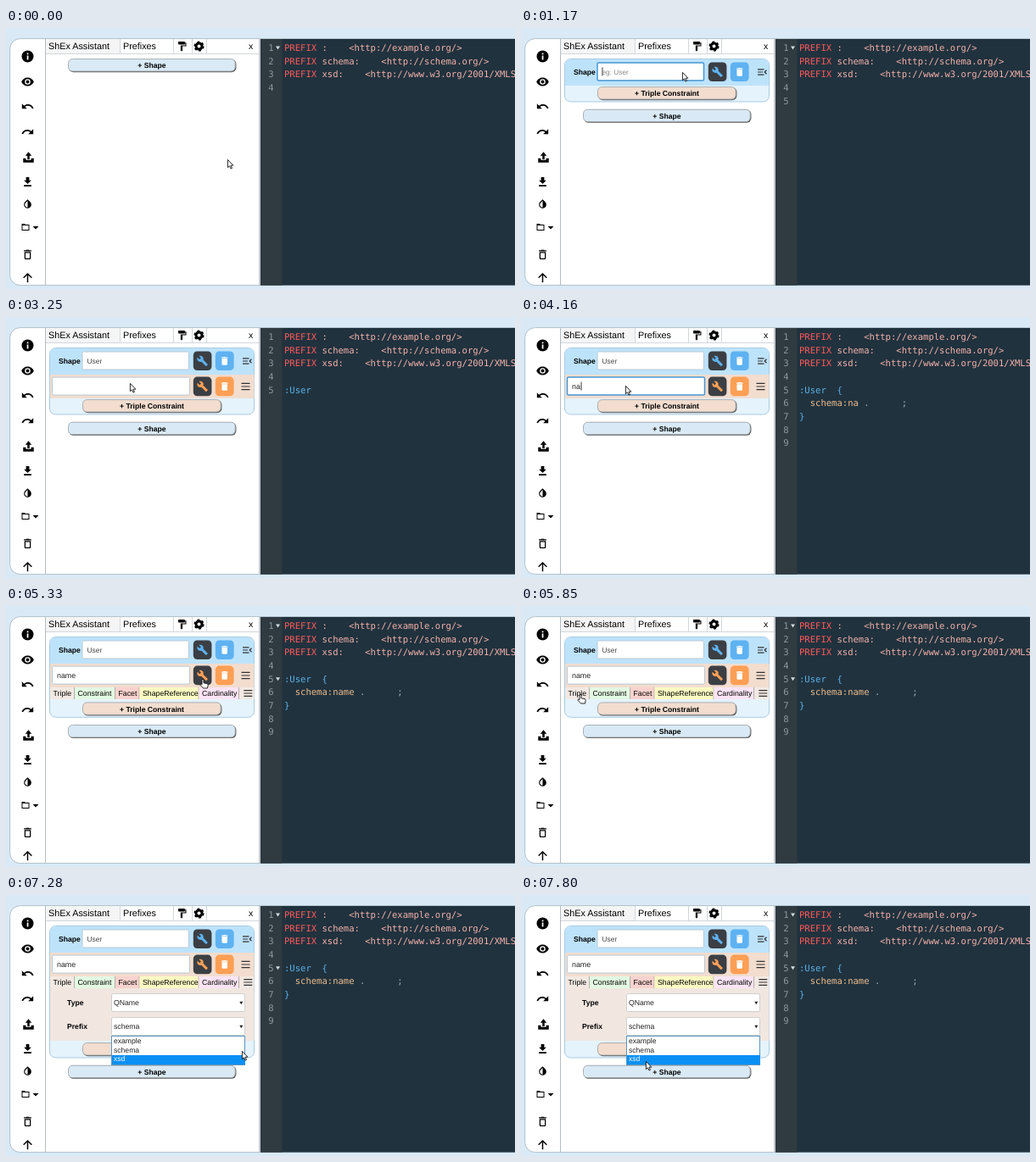
An HTML page that plays this animation: 600 px wide and 308 px high, repeating every 8 s.

```html
<!DOCTYPE html>
<html lang="en">
<head>
<meta charset="utf-8">
<title>Shape assistant</title>
<style>
  html, body { margin: 0; width: 100%; height: 100%; overflow: hidden; background: #d9eaf6; }
  svg { display: block; width: 600px; height: 308px; }
  text { white-space: pre; font-family: "Liberation Sans", Arial, sans-serif; text-rendering: geometricPrecision; }
  .code text { font: 10.55px "DejaVu Sans Mono", monospace; }
</style>
</head>
<body>
<svg id="stage" viewBox="0 0 600 308"><g id="frame"></g><g id="scene"></g></svg>
<script>
const LOOP = 8000, STEP = 130, LAST_STEP = 60;

// Icons on a 24 unit grid
const ICONS = {
  eye: 'M12 4.5C7 4.5 2.7 7.6 1 12c1.7 4.4 6 7.5 11 7.5s9.3-3.1 11-7.5c-1.7-4.4-6-7.5-11-7.5zM12 17a5 5 0 1 1 0-10 5 5 0 0 1 0 10zm0-8a3 3 0 1 0 0 6 3 3 0 0 0 0-6z',
  undo: 'M12.5 8c-2.6 0-5 1-6.9 2.6L2 7v9h9l-3.6-3.6c1.4-1.2 3.1-1.9 5.1-1.9 3.5 0 6.5 2.3 7.6 5.5l2.4-.8C21.1 11 17.1 8 12.5 8z',
  redo: 'M11.5 8c2.6 0 5 1 6.9 2.6L22 7v9h-9l3.6-3.6c-1.4-1.2-3.1-1.9-5.1-1.9-3.5 0-6.5 2.3-7.6 5.5l-2.4-.8C2.9 11 6.9 8 11.5 8z',
  upload: 'M12 1l-6 7h4v7h4V8h4zM2 13h5v3h10v-3h5v8H2z',
  download: 'M19 9h-4V3H9v6H5l7 7zM5 18v2.5h14V18z',
  drop: 'M12 2l-5.7 5.7a8 8 0 1 0 11.4 0zM12 5v14.5a6 6 0 0 1-4.2-10.3z',
  folder: 'M3 4h7l2 2h9v14H3zM5 8v10h14V8z',
  bin: 'M6 19a2 2 0 0 0 2 2h8a2 2 0 0 0 2-2V7H6zM8 9h8v10H8zM15.5 4l-1-1h-5l-1 1H5v2h14V4z',
  solidBin: 'M6 19a2 2 0 0 0 2 2h8a2 2 0 0 0 2-2V7H6zM15.5 4l-1-1h-5l-1 1H5v2h14V4z',
  up: 'M4 12l1.5 1.5 5.4-5.4V21h2.2V8.1l5.4 5.4L20 12l-8-8z',
  wrench: 'M22.7 19l-9.1-9.1c.9-2.3.4-5-1.5-6.9-2-2-5-2.4-7.4-1.3L9 6 6 9 1.6 4.7C.4 7.1.9 10.1 2.9 12.1c1.9 1.9 4.6 2.4 6.9 1.5l9.1 9.1c.4.4 1 .4 1.4 0l2.3-2.3c.5-.4.5-1.1.1-1.4z',
  roller: 'M18 4V3a1 1 0 0 0-1-1H5a1 1 0 0 0-1 1v4a1 1 0 0 0 1 1h12a1 1 0 0 0 1-1V6h1v4H9v11a1 1 0 0 0 1 1h2a1 1 0 0 0 1-1v-9h8V4z',
};

const rect = (x, y, w, h, fill, extra = '') =>
  `<rect x="${x}" y="${y}" width="${w}" height="${h}" fill="${fill}" ${extra}/>`;
const path = (d, fill, extra = '') => `<path d="${d}" fill="${fill}" fill-rule="evenodd" ${extra}/>`;
const line = (d, color, width = 1) => path(d, 'none', `stroke="${color}" stroke-width="${width}"`);
const text = (x, y, str, size = 8.6, extra = '') =>
  `<text x="${x}" y="${y}" font-size="${size}" ${extra}>${str.replace(/</g, '&lt;')}</text>`;
const bold = (x, y, str, extra = '') => text(x, y, str, 8.65, 'font-weight="bold" ' + extra);
const icon = (name, cx, cy, size, fill = '#000') =>
  path(ICONS[name], fill, `transform="translate(${cx - size / 2} ${cy - size / 2}) scale(${size / 24})"`);
const bars = (x, y, gap) => line(`M${x} ${y}h10m-10 ${gap}h10m-10 ${gap}h10`, '#333', 1.2);

// A darker plate peeks out at the bottom and right, like an outset border
const button = (x, y, w, label, fill) =>
  rect(x + 1, y + 1, w - .6, 15.2, '#555', 'rx="5.5"') +
  rect(x + .5, y + .6, w - 1.3, 14.4, fill, 'rx="5" stroke="#a3a9ad" stroke-width=".9"') +
  bold(x + w / 2, y + 11.2, label, 'text-anchor="middle"');

function input(x, y, w, value, focused, caret, size = 8.4, color = '#444') {
  return rect(x + .5, y + .5, w - 1, 21, '#fff', `rx="1.5" stroke="${focused ? '#4597d4' : '#b9c9d3'}" stroke-width="${focused ? 1.5 : 1}"`) +
    text(x + 6, y + 14.1, value, size, `fill="${color}"`) + (caret ? rect(caret, y + 6, .9, 10, '#222') : '');
}

const tools = (y, color) =>
  rect(220.8, y, 21.6, 22.6, '#3b3f44', 'rx="4.5"') + icon('wrench', 231.6, y + 11.3, 13.5, color) +
  rect(246.8, y, 21.8, 22.6, color, 'rx="4.5"') + icon('solidBin', 257.7, y + 11.3, 13, '#fff');

const select = (y, value) =>
  rect(124.5, y + .6, 157, 21, '#fff', 'rx="1.5" stroke="#cfcfcf"') +
  text(127, y + 14.1, value, 8.7, 'fill="#222"') + path(`M275.3 ${y + 9.8}h4l-2 3.4z`, '#222');

function drawFrame() {
  const gear = `<circle cx="227.5" cy="21.6" r="3.5" fill="none" stroke="#000" stroke-width="3"/>
    <circle cx="227.5" cy="21.6" r="5.2" fill="none" stroke="#000" stroke-width="1.8" stroke-dasharray="2.7 2.745"/>`;
  const info = `<circle cx="25.5" cy="33.5" r="7"/>` + rect(24.7, 32.5, 1.7, 5, '#fff') + rect(24.7, 29.5, 1.7, 1.8, '#fff');
  return path('M601 12.6H16.6a12 12 0 0 0-12 12v267a12 12 0 0 0 12 12H601z', '#fff', 'stroke="#b0c0cb"') +
    line('M46.5 13v290', '#b5bcc1') + line('M299 13v290', '#b5bcc1', 1.6) +
    rect(47, 13, 87, 17, '#f5f5f5') +
    line('M47 30.5h251M134.5 13v17.5M197.5 13v17.5M219.5 13v17.5M236.5 13v17.5', '#d3d7da') +
    text(50, 25.3, 'ShEx Assistant', 10.8) + text(138, 25.3, 'Prefixes', 10.8) + text(286, 25.3, 'x', 10.5) +
    icon('roller', 207.5, 21.6, 13.3) + gear + info +
    icon('eye', 25.5, 63.5, 16) + icon('undo', 25.5, 92.7, 16) + icon('redo', 25.5, 122.7, 16) +
    icon('upload', 26.5, 153.2, 15) + icon('download', 25.5, 181.6, 15) + icon('drop', 25.5, 207.7, 13) +
    icon('folder', 23, 235, 12) + path('M31.5 234h7l-3.5 3.5z', '#000') +
    icon('bin', 25.5, 267.3, 15) + icon('up', 25.5, 294.3, 16) +
    rect(300, 13, 300, 290.6, '#20323e') + rect(300, 13, 25.5, 290.6, '#2f3a41');
}

// Last entry [time, value...] that has begun
const current = (track, t) => track.filter(([start]) => start <= t).pop();
const within = (t, ...spans) => spans.some(([from, to]) => t >= from && t < to);

const SHAPE_TEXT = [[0, ''], [1690, 'U'], [1820, 'Us'], [1950, 'Use'], [2080, 'User']];
const TRIPLE_TEXT = [[0, ''], [3900, 'na'], [4290, 'nam'], [4420, 'name']];
const SHAPE_CODE = [[0, ''], [1950, ':U .'], [2080, ':Use .'], [2210, ':User .'], [3250, ':User'], [4160, ':User  {']];
const TRIPLE_CODE = [[0, ''], [4160, 'na'], [4420, 'name']];

// Pointer path: time, x, y, and 1 where it is a hand from then on
const POINTER = [
  [0, 261, 155], [520, 205, 47, 1], [650, 198, 46], [910, 188, 74], [1170, 190, 52], [1430, 194, 47],
  [2600, 194, 47], [3120, 150, 78, 1], [3250, 146, 78], [3640, 123, 81], [4680, 123, 81],
  [5070, 232, 86, 1], [5330, 232, 86, 1], [5460, 205, 92], [5850, 70, 104, 1], [6110, 68, 106], [6240, 68, 111.5],
  [6500, 110, 128], [6890, 277, 153], [7020, 278, 156], [7410, 278, 198], [7800, 147, 196],
];

function pointer(t) {
  const i = POINTER.findLastIndex(([start]) => start <= t);
  const [t0, x0, y0, hand] = POINTER[i];
  const [t1, x1, y1] = POINTER[i + 1] || [t0 + 1, x0, y0];
  const k = Math.min(1, (t - t0) / (t1 - t0));
  const place = `stroke="#111" stroke-width=".9" stroke-linejoin="round" transform="translate(${x0 + (x1 - x0) * k} ${y0 + (y1 - y0) * k})"`;
  return hand
    ? path('M-1 .8q1-1 2 0v4l4 .8q1.4.4 1.2 1.8l-.7 3.6h-5l-3.5-3.8q0-1.4 1.3-1l.7.6z', '#fff', place)
    : path('M.4.4v9.3l2.1-1.9 1.5 3.3 1.5-.7-1.5-3.2h2.9z', '#fff', place);
}

function code(t) {
  const lines = t < 780 ? 4 : t < 4160 ? 5 : 9;
  const row = n => 26.8 + (n - 1) * 15.7;
  const put = (n, column, str, fill) => text(328 + column * 6.351, row(n), str, 10.55, `fill="${fill}"`);
  const prefixes = [':    <http://example.org/>', 'schema:    <http://schema.org/>', 'xsd:    <http://www.w3.org/2001/XMLSchema#>'];
  let out = '';
  for (let n = 1; n <= lines; n++)
    out += text(315.5, row(n), String(n), 10.55, 'fill="#8d999f" text-anchor="end"');
  prefixes.forEach((str, i) => out += put(i + 1, 0, 'PREFIX', '#ff5a5a') + put(i + 1, 7, str, '#f5b3ab'));
  out += put(5, 0, current(SHAPE_CODE, t)[1], '#5cb3ea');
  if (t >= 4160) {
    const name = current(TRIPLE_CODE, t)[1];
    out += put(6, 2, 'schema:' + name, '#eebd8c') + put(6, 10 + name.length, '.      ;', '#9fb0b8') + put(7, 0, '}', '#5cb3ea');
  }
  if (!within(t, [780, 1040], [1950, 2600], [3250, 3510], [4160, 4810])) {
    const fold = n => path(`M318 ${row(n) - 5.4}h5l-2.5 4z`, '#d5dce0');
    out += fold(1) + (t >= 4810 ? fold(5) : '');
  }
  return `<g class="code">${out}</g>`;
}

function tabs() {
  const list = [['Triple', 52, '#f3e9e2'], ['Constraint', 81, '#e2f9e2'], ['Facet', 129, '#f9d2ce'],
    ['ShapeReference', 157.5, '#fbfac2'], ['Cardinality', 227.5, '#fbe4f4'], ['', 275, '#f3e9e2']];
  return list.map(([label, x, fill], i) => {
    const end = i < 5 ? list[i + 1][1] : 292.5;
    return rect(x, 96, end - x, 14, fill) + (label && line(`M${end - .5} 96v14`, '#b5b0ac')) + text(x + 3.5, 106.1, label, 8.75);
  }).join('') + bars(280.3, 99.7, 3.3);
}

function dropdown(active) {
  const options = ['example', 'schema', 'xsd'].map((label, i) =>
    (i === active ? rect(125, 167 + i * 11, 157, 11, '#0a90f5') : '') +
    text(127, 174.7 + i * 10.8, label, 8.6, `fill="${i === active ? '#fff' : '#222'}"`));
  return rect(124.5, 166.5, 157, 34, '#fff', 'stroke="#5a94c0"') + options.join('');
}

function assistant(t) {
  if (t < 650) return button(73, 36, 198, '+ Shape', '#d9eaf6');
  const hasTriple = t >= 3250, hasTabs = t >= 5200, hasPanel = t >= 5980;
  const top = hasPanel ? 174 : hasTabs ? 113.3 : hasTriple ? 97 : 69;
  const shapeName = current(SHAPE_TEXT, t)[1], tripleName = current(TRIPLE_TEXT, t)[1];
  const shapeFocus = within(t, [1040, 3250]), tripleFocus = within(t, [3510, 5200]);

  let out = rect(51.5, 36.5, 241, top - 18.5, '#e5f3fd', 'rx="7" stroke="#a9cbe2"') +
    path('M52 68V43.5a6.5 6.5 0 0 1 6.5-6.5h227a6.5 6.5 0 0 1 6.5 6.5V68z', '#bde3fb') +
    bold(62, 55.2, 'Shape') +
    input(89.5, 40.5, 126.5, shapeName, shapeFocus, within(t, [1040, 1430], [1690, 2210]) && 95.5 + shapeName.length * 4.5);
  if (!shapeName) out += text(95.5, 54.6, 'eg: User', 8.3, 'fill="#888"');
  out += tools(40.5, '#5eb2f1') + line('M279 48.8h7.5M279 52h6M279 55.2h7.5M289.5 49.7l-2.4 2.3 2.4 2.3', '#333', 1.2);

  if (hasTriple) {
    out += rect(52, 68, 240.5, 28, '#f2ddcf') +
      input(54, 70.6, 163, tripleName, tripleFocus, within(t, [3510, 3770], [3900, 4680]) && 60.3 + [0, 0, 10.3, 17.5, 22.5][tripleName.length], 8.9, '#222') +
      tools(70.6, '#fd9f55') + bars(277.5, 78.3, 3.7);
  }
  if (hasTabs) out += tabs();
  if (hasPanel) {
    out += rect(52, 110, 240.5, 62, '#f1e7e0') + bold(72, 130.2, 'Type') + bold(72, 158.2, 'Prefix') +
      select(116, 'QName') + select(144, 'schema');
  }
  out += button(90, top, 164, '+ Triple Constraint', '#f2ddcf') + button(73, top + 26.6, 198, '+ Shape', '#d9eaf6');
  if (t >= 7020) out += dropdown(t < 7280 ? 1 : 2);
  return out;
}

const scene = document.getElementById('scene');
document.getElementById('frame').innerHTML = drawFrame();

const began = performance.now();
let shown = -1;
function tick() {
  const step = Math.min(LAST_STEP, Math.floor(((performance.now() - began) % LOOP) / STEP));
  if (step !== shown) {
    shown = step;
    const t = step * STEP;
    scene.innerHTML = code(t) + assistant(t) + pointer(t);
  }
  requestAnimationFrame(tick);
}
tick();
</script>
</body>
</html>
```
